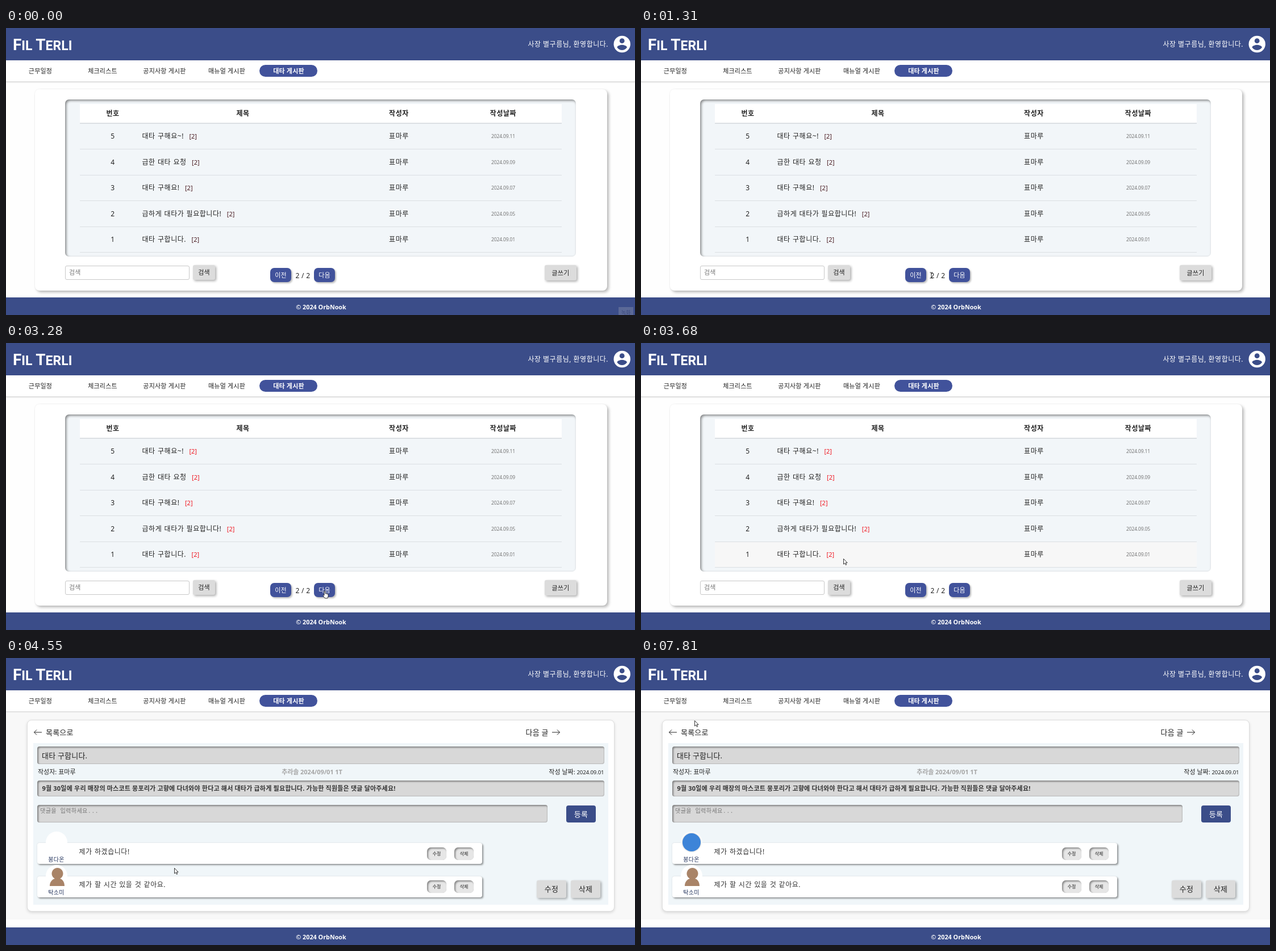
An HTML page for the animation above (8000 ms loop, 1107 by 506 pixels).

```html
<!DOCTYPE html>
<html lang="ko">
<head>
<meta charset="utf-8">
<title>대타 게시판</title>
<style>
  :root { --navy: #3b4d89; --pill: #41529b; }
  html, body { margin: 0; width: 100%; height: 100%; overflow: hidden; background: #fefefe; }
  #stage { position: absolute; left: 0; top: 0; width: 1107px; height: 506px; overflow: hidden;
    font: 12px 'Noto Sans', 'Noto Sans CJK KR', sans-serif; color: #222; }
  #stage div { position: absolute; box-sizing: border-box; white-space: pre; }
  #stage svg { position: absolute; left: 0; top: 0; }
  .layer { left: 0; top: 0; width: 1107px; height: 506px; }

  .c { text-align: center; }
  .r { text-align: right; }
  .b { font-weight: 700; }
  .t11 { font-size: 11px; letter-spacing: .2px; }
  .t12 { font-size: 12px; letter-spacing: .55px; word-spacing: .6px; }
  .t13 { font-size: 13px; letter-spacing: .2px; }
  .plain { letter-spacing: .3px; }
  .white { color: #fff; }
  .hello { font-weight: 500; letter-spacing: .5px; }
  .copy { font-weight: 600; font-size: 10.8px; }
  .brand { font: 700 23px Roboto, sans-serif; color: #fff; }
  .brand span { font-size: 28px; }
  .date { font-size: 8.6px; letter-spacing: -.2px; color: #777; }
  .count { font-size: 11px; letter-spacing: 0; margin-left: 9.5px; color: #f01822; }
  .visited .count { color: #4a1c22; }

  .navy { background: var(--navy); }
  .nav { background: #fff; border-bottom: 1px solid #dcdcdc; box-shadow: 0 1px 2px #0002; }
  .pill { background: var(--pill); border-radius: 11px; }
  .panel { background: #fff; border-radius: 8px; box-shadow: 3px 3px 5px #0004, 0 0 3px #0001; }
  .board { background: #f2f6f9; border-radius: 7px; box-shadow: inset 2px 2px 4px #0007; }
  .head { background: #fff; border-bottom: 2px solid #dce0e4; }
  .line { background: #dbdfe3; }
  .hover { background: #f7f7f7; }
  .field { background: #fff; border: 1px solid #c8c8c8; border-radius: 3px; }
  .hint { color: #777; }
  .grey { background: #dcdcdc; border-radius: 3px; box-shadow: 2px 2px 4px #0005; }
  .blue { background: var(--pill); border-radius: 7px; box-shadow: 2px 2px 3px #0004; }
  .tag { background: #8c93ac66; color: #25346c99; font-size: 9px; }

  .cover { background: #f8f8f8; }
  .blank { background: #fefefe; }
  .sheet { background: #fff; border: 1px solid #dedede; border-radius: 8px; box-shadow: 0 2px 5px #0002; }
  .pale { background: #f0f6f9; }
  .sunk { background: #d8d8d8; border-radius: 4px; box-shadow: inset 2px 2px 3px #0006, inset -1px -1px 1px #0002; }
  .card { background: #fff; border-radius: 4px; box-shadow: 2px 2px 3px #0006, 0 0 2px #0002; }
  .mini { background: #e6e6e6; border-radius: 7px; box-shadow: inset 2px 2px 3px #0006, 0 0 1px #0004; font-size: 8px; }
  .send { background: var(--navy); border-radius: 4px; }
  .body { color: #333; }
  .faint { color: #a6a6a6; font-weight: 600; letter-spacing: -.1px; font-size: 11px; }
  .meta { font-size: 11px; }
  .digits { font-size: 9.6px; letter-spacing: -.1px; }
  .mono { font: 300 10.2px 'Noto Sans Mono', 'Noto Sans CJK KR', monospace; letter-spacing: .3px; color: #777; }
  .who { font-size: 10px; letter-spacing: .3px; font-weight: 500; color: #26365f; }
  .disc { background: #fff; border-radius: 50%; }
  .ball { background: #3d84d8; border-radius: 50%; box-shadow: 0 0 3px #0004; }

  /* 1% of the loop is 80 ms */
  [class*="a-"] { animation: 8s step-end infinite; }
  .a-tag { animation-name: tag; }
  .a-first { animation-name: first; }
  .a-second { animation-name: second; }
  .a-visited { animation-name: visited; }
  .a-hover { animation-name: hover; }
  .a-loading { animation-name: loading; }
  .a-detail { animation-name: detail; }
  .a-ball { animation-name: ball; }
  .a-arrow { animation-name: arrow; }
  .a-hand { animation-name: hand; }
  .a-beam { animation-name: beam; }
  .a-no { animation-name: no; }
  @keyframes tag { 0% { visibility: visible } .875% { visibility: hidden } }
  @keyframes visited { 0% { visibility: visible } 20.875% { visibility: hidden } }
  @keyframes first { 0% { visibility: hidden } 20.875% { visibility: visible } 41% { visibility: hidden } }
  @keyframes second { 0% { visibility: hidden } 41% { visibility: visible } 54.375% { visibility: hidden } }
  @keyframes hover { 0% { visibility: hidden } 45.125% { visibility: visible } 54.375% { visibility: hidden } }
  @keyframes loading { 0% { visibility: hidden } 54.375% { visibility: visible } 56.875% { visibility: hidden } }
  @keyframes detail { 0% { visibility: hidden } 56.875% { visibility: visible } }
  @keyframes ball { 0% { visibility: hidden } 61.75% { visibility: visible } }
  @keyframes arrow { 0% { visibility: hidden } 3.25% { visibility: visible } 11.125% { visibility: hidden } 43.625% { visibility: visible } }
  @keyframes hand { 0% { visibility: hidden } 11.125% { visibility: visible } 14.625% { visibility: hidden }
    17.25% { visibility: visible } 20.875% { visibility: hidden } 35.125% { visibility: visible } 43.625% { visibility: hidden } }
  @keyframes beam { 0% { visibility: hidden } 14.625% { visibility: visible } 17.25% { visibility: hidden }
    32.5% { visibility: visible } 35.125% { visibility: hidden } }
  @keyframes no { 0% { visibility: hidden } 20.875% { visibility: visible } 32.5% { visibility: hidden } }

  #pointer { animation: travel 8s infinite; }
  @keyframes travel {
    0% { transform: translate(684px, 500px); animation-timing-function: step-end }
    3.25% { transform: translate(684px, 500px); animation-timing-function: steps(12, jump-start) }
    13.75% { transform: translate(553px, 435px); animation-timing-function: steps(4, jump-start) }
    17.25% { transform: translate(511px, 436px); animation-timing-function: steps(2, jump-start) }
    19% { transform: translate(490px, 436px); animation-timing-function: step-end }
    31.625% { transform: translate(490px, 436px); animation-timing-function: steps(7, jump-start) }
    37.75% { transform: translate(561px, 437px); animation-timing-function: step-end }
    43.625% { transform: translate(561px, 437px); animation-timing-function: steps(4, jump-start) }
    46.7% { transform: translate(356px, 380px); animation-timing-function: steps(4, jump-start) }
    50.2% { transform: translate(296px, 370px); animation-timing-function: step-end }
    69.125% { transform: translate(296px, 370px); animation-timing-function: steps(6, jump-start) }
    74.1% { transform: translate(273px, 252px); animation-timing-function: step-end }
    91% { transform: translate(273px, 252px); animation-timing-function: steps(4, jump-start) }
    94.1% { transform: translate(248px, 183px); animation-timing-function: step-end }
    95.125% { transform: translate(248px, 183px); animation-timing-function: steps(4, jump-start) }
    98.4%, 100% { transform: translate(94px, 110px); animation-timing-function: step-end }
  }
</style>
</head>
<body>
<div id="stage"></div>
<script>
const stage = document.getElementById('stage');

function box(parent, cls, x, y, w, h, html = '') {
  const el = document.createElement('div');
  el.className = cls;
  el.style.cssText = `left:${x}px;top:${y}px;width:${w}px;height:${h}px;line-height:${h}px`;
  el.innerHTML = html;
  parent.append(el);
  return el;
}
const layer = (parent, cls) => box(parent, 'layer ' + cls, 0, 0, 1107, 506);
// y is the middle of the line
const left = (parent, cls, x, y, html) => box(parent, cls, x, y - 10, 800, 20, html);
const mid = (parent, cls, x, y, html) => box(parent, 'c ' + cls, x - 150, y - 10, 300, 20, html);
const right = (parent, cls, x, y, html) => box(parent, 'r ' + cls, x - 300, y - 10, 300, 20, html);
const svg = (parent, html) =>
  parent.insertAdjacentHTML('beforeend', `<svg width="1107" height="506">${html}</svg>`);

const WRITER = '표마루';

function addFrame() {
  box(stage, 'navy', 0, 0, 1107, 57);
  left(stage, 'brand', 12, 30, '<span>F</span>IL <span>T</span>ERLI');
  right(stage, 'white hello', 1060, 29, '사장 별구름님, 환영합니다.');
  svg(stage, `<circle cx="1084.2" cy="28.5" r="14.7" fill="#fff"/>
    <g fill="#3b4d89"><circle cx="1084.2" cy="22.7" r="4.4"/>
    <path d="M1075.5 34.3c0-3 5.8-4.5 8.7-4.5s8.7 1.5 8.7 4.5a10.5 10.5 0 0 1-17.4 0z"/></g>`);
  box(stage, 'nav', 0, 57, 1107, 38);
  box(stage, 'pill', 446, 65, 102, 21);
  [['근무일정', 60.5], ['체크리스트', 170], ['공지사항 게시판', 279], ['매뉴얼 게시판', 388.5]]
    .forEach(([name, x]) => mid(stage, 't11', x, 75.5, name));
  mid(stage, 't11 b white', 497.5, 75.5, '대타 게시판');
  box(stage, 'navy', 0, 475, 1107, 31);
  mid(stage, 'white copy', 554.5, 492, '© 2024 OrbNook');
  box(stage, 'tag c a-tag', 1078, 492, 26, 20, '녹화');
}

function addBoard() {
  box(stage, 'panel', 51, 108, 1007, 355);
  box(stage, 'board', 104, 126, 899, 277);
  box(stage, 'head', 130, 134, 848, 34.5);
  [['번호', 188], ['제목', 417], ['작성자', 691.5], ['작성날짜', 875]]
    .forEach(([name, x]) => mid(stage, 't12 b', x, 151, name));
  box(stage, 'hover a-hover', 130, 350, 848, 45);
  for (let i = 1; i <= 5; i++) box(stage, 'line', 130, Math.round(167.7 + i * 45.5), 848, 1);
  box(stage, 'field', 104, 419, 219, 25);
  left(stage, 't11 hint', 111, 431, '검색');
  box(stage, 'grey c t11', 329, 418, 39, 26, '검색');
  box(stage, 'blue c t11 white', 465, 423, 37, 25, '이전');
  box(stage, 'blue c t11 white', 542, 423, 37, 25, '다음');
  box(stage, 'grey c t11', 948, 418, 56, 27, '글쓰기');
}

function addPosts(cls, page, top, posts) {
  const list = layer(stage, cls);
  posts.forEach(([title, day], i) => {
    const y = 191.4 + i * 45.5;
    mid(list, 't12', 188, y, top - i);
    left(list, 't12', 239.5, y, `${title}<span class="count">[2]</span>`);
    mid(list, 't12', 691.5, y, WRITER);
    mid(list, 'date', 875, y, '2024.09.' + day);
  });
  mid(list, 'plain', 522.5, 436.5, page + ' / 2');
}

function addDetail() {
  const page = layer(stage, 'a-detail');
  box(page, 'blank', 0, 96, 1107, 379);
  box(page, 'cover', 0, 96, 1107, 365);
  box(page, 'sheet', 37, 108.5, 1034, 338.5);
  svg(page, `<g fill="none" stroke="#222"><path d="M63 131H49.5M54 126.5L49.5 131l4.5 4.5"/>
    <path d="M961 131h13.5M970 126.5l4.5 4.5l-4.5 4.5"/></g>`);
  left(page, 't13', 70, 131, '목록으로');
  left(page, 't13', 914.5, 131, '다음 글');
  box(page, 'pale', 48, 149.5, 1012, 285.5);
  box(page, 'sunk', 55, 156, 998, 31);
  left(page, 't13', 63, 172, '대타 구합니다.');
  left(page, 'meta', 56, 201, '작성자: ' + WRITER);
  mid(page, 'faint', 538.5, 201, '추라솔 2024/09/01 1T');
  right(page, 'meta', 1052.5, 201, '작성 날짜: <span class="digits">2024.09.01</span>');
  box(page, 'sunk', 55, 215.5, 998, 28.5);
  left(page, 't11 b body', 63.5, 229.5, '9월 30일에 우리 매장의 마스코트 뭉포리가 고향에 다녀와야 한다고 해서 ' +
    '대타가 급하게 필요합니다. 가능한 직원들은 댓글 달아주세요!');
  box(page, 'sunk', 55, 259, 898, 31);
  left(page, 'mono', 60, 269, '댓글을 입력하세요...').style.lineHeight = '20px';
  box(page, 'send c t13 white', 986, 259.5, 52, 30, '등록');
  [[326, '봉다온', '제가 하겠습니다!'], [384.5, '탁소미', '제가 할 시간 있을 것 같아요.']]
    .forEach(([y, name, text]) => {
      box(page, 'card', 55, y, 783, 37);
      box(page, 'disc', 69.5, y - 20, 38, 38);
      mid(page, 'who', 88.5, y + 28.5, name);
      left(page, 't12 body', 128.5, y + 15.5, text);
      box(page, 'mini c', 741, y + 7.5, 34, 22, '수정');
      box(page, 'mini c', 789, y + 7.5, 34, 22, '삭제');
    });
  box(page, 'ball a-ball', 73, 308.5, 32, 32);
  svg(page, '<path fill="#a98468" d="M77 402c0-8 5-12 9-13a10 10 0 1 1 9 0c4 1 8 5 8 13z"/>');
  box(page, 'grey c t13', 934, 391.5, 52, 31, '수정');
  box(page, 'grey c t13', 994, 391.5, 52, 31, '삭제');
}

function addPointer() {
  svg(stage, `<g id="pointer" stroke-linejoin="round">
    <path class="a-arrow" d="M.5 .5v9.5l2.2-2l1.6 3.4l1.5-.7l-1.5-3.3h2.8z" fill="#fff" stroke="#222" stroke-width=".9"/>
    <path class="a-hand" d="M-1 7V1a1 1 0 0 1 2 0v3.5l5 1.2v4l-1.2 3.3h-4.5l-3.3-4.5q0-1.5 2-.5z" fill="#fff" stroke="#222" stroke-width=".9"/>
    <path class="a-beam" d="M-2.5-5H-.5L0-4.5L.5-5h2M0-4.5v9M-2.5 5H-.5L0 4.5L.5 5h2" fill="none" stroke="#222"/>
    <g class="a-no" stroke="#d8202c" stroke-width="1.8"><circle r="4.3" fill="#fff"/><path d="M-3-3L3 3"/></g>
  </g>`);
}

const older = [['대타 구해요~!', '11'], ['급한 대타 요청', '09'], ['대타 구해요!', '07'],
  ['급하게 대타가 필요합니다!', '05'], ['대타 구합니다.', '01']];
const newer = [['대타 구합니다~!', '22'], ['대타 구합니다!', '20'], ['9월 30일 대타 필요합니다.', '18'],
  ['대타 구합니다!', '15'], ['9월 26일 대타 부탁드립니다!', '12']];

addFrame();
addBoard();
addPosts('visited a-visited', 2, 5, older);
addPosts('a-first', 1, 10, newer);
addPosts('a-second', 2, 5, older);
const loading = layer(stage, 'a-loading');
box(loading, 'blank', 0, 96, 1107, 379);
mid(loading, 't12', 554.5, 102, '게시글을 불러오는 중...');
addDetail();
addPointer();
</script>
</body>
</html>
```
